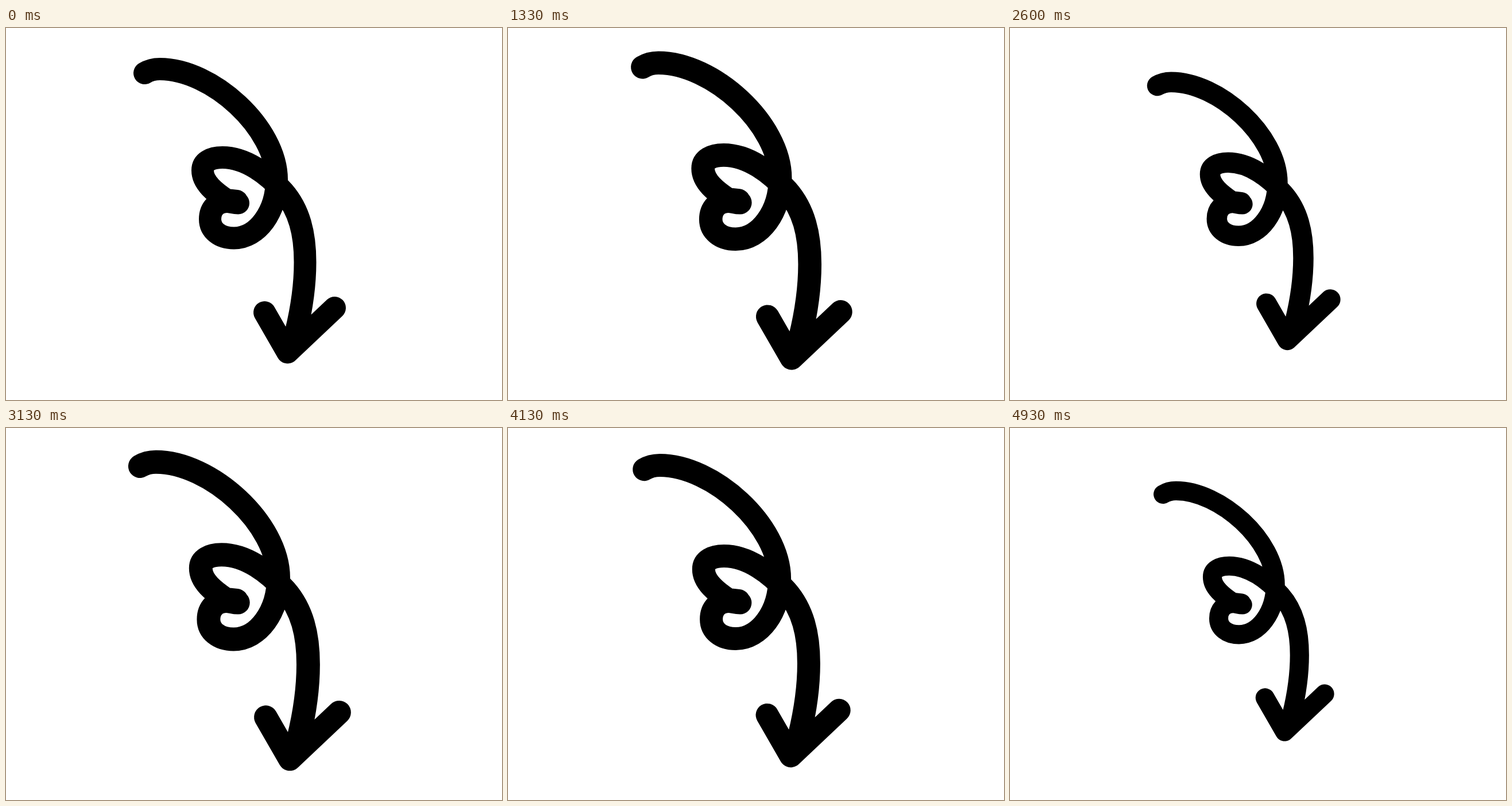
An HTML page with a canvas that plays this animation: 864 px wide and 648 px high, repeating every 4990 ms.

```html
<!DOCTYPE html>
<html lang="en">
<head>
<meta charset="utf-8">
<title>Heart arrow</title>
<style>
html, body { margin: 0; width: 100%; height: 100%; overflow: hidden; background: #fff; }
canvas { display: block; width: 864px; height: 648px; }
</style>
</head>
<body>
<canvas id="stage" width="864" height="648"></canvas>
<script>
const ctx = document.getElementById('stage').getContext('2d');
const LOOP = 4990, STEP = 200 / 3;
const CENTER = { x: 409.3, y: 324.5 };
const LEFT_EDGE = 205;
const MIN = 0.85, MAX = 1.15;

// Beat timing, counted in steps
const BEAT = 15.39, RISE = BEAT / 3, OFFSET = RISE / 2;

const arrow = new Path2D(
  // tail, loop and lower heart lobe
  'M241.5 78.5 Q253 71.5 268 71.5 C359 71.5 471.5 174 471.5 264 ' +
  'C471.5 320 438 366 397 366 C372 366 355.5 352 355.5 333 ' +
  'C355.5 315 367 302.5 385 302.5 C392 302.5 396 305 404.5 305 ' +
  // upper lobe and stem
  'M402 301.5 L384 299.5 C365 287 342.5 270 342.5 248 C342.5 233 357 225.5 377 225.5 ' +
  'C418 225.5 456 254.8 483 285 C511 317 521 358 521 408 C521 445 516 485 505 530 ' +
  // head
  'M450.5 495.5 L490.5 565 L572.5 487.5'
);

// Steady growth, then a quadratic ease back to rest
function beatScale(step) {
  const p = (step + OFFSET) % BEAT;
  if (p < RISE) return MIN + (MAX - MIN) * p / RISE;
  const rest = 1 - (p - RISE) / (BEAT - RISE);
  return MIN + (MAX - MIN) * rest * rest;
}

// Steps fall on whole hundredths of a second
function stepAt(ms) {
  return Math.floor((Math.floor(ms / 10) * 10 + 5) / STEP);
}

function draw(ms) {
  const s = beatScale(stepAt(ms % LOOP));
  ctx.fillStyle = '#fff';
  ctx.fillRect(0, 0, 864, 648);
  ctx.save();
  ctx.beginPath();
  ctx.rect(LEFT_EDGE, 0, 864 - LEFT_EDGE, 648);
  ctx.clip();
  ctx.translate(CENTER.x, CENTER.y);
  ctx.scale(s, s);
  ctx.translate(-CENTER.x, -CENTER.y);
  ctx.lineWidth = 39;
  ctx.lineCap = ctx.lineJoin = 'round';
  ctx.strokeStyle = '#000';
  ctx.stroke(arrow);
  ctx.restore();
}

const start = performance.now();
function tick() {
  draw(performance.now() - start);
  requestAnimationFrame(tick);
}
tick();
</script>
</body>
</html>
```
